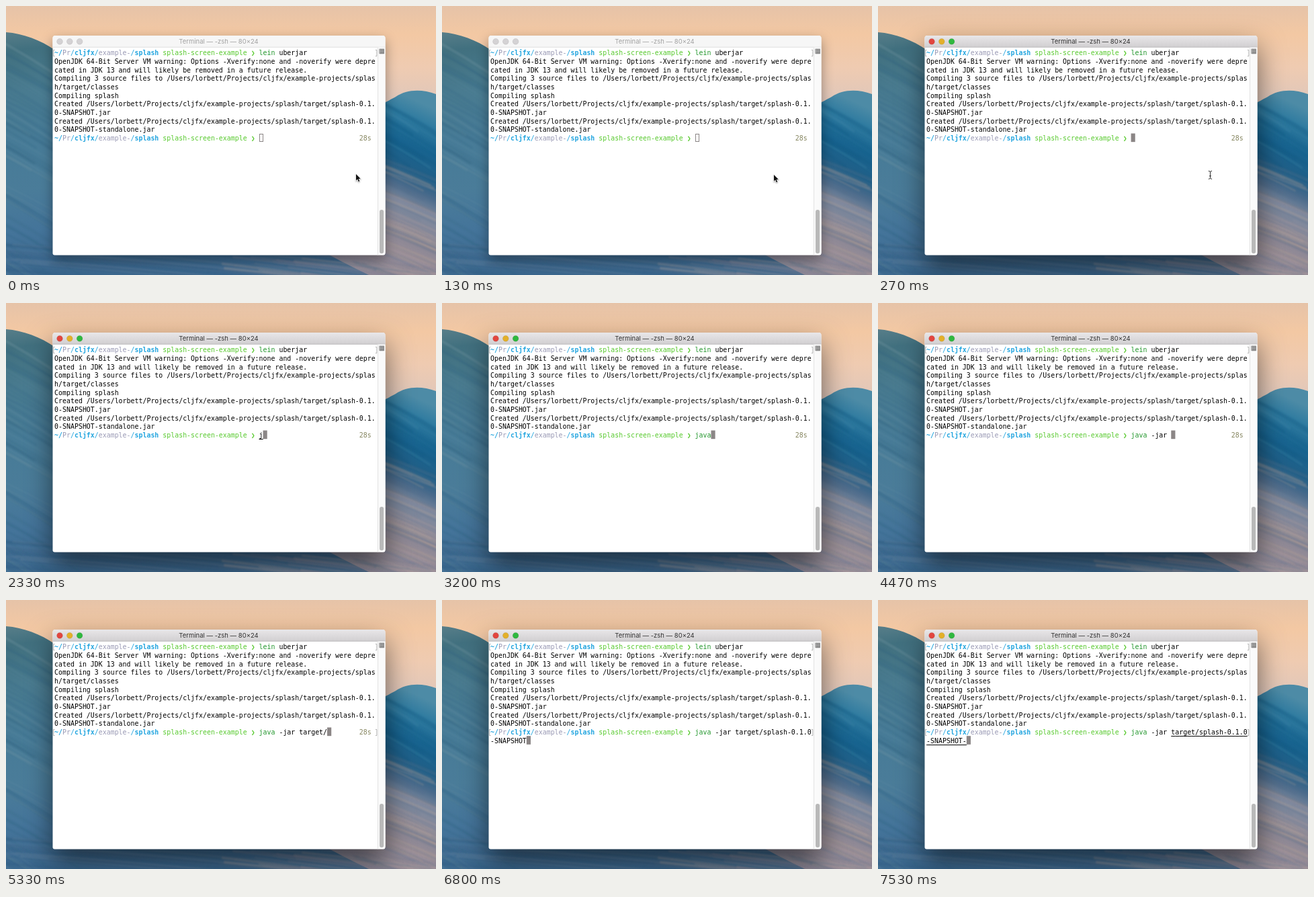
Write an HTML page with a canvas that moves like this. It is 640x400 px and loops after 8000 ms.

```html
<!DOCTYPE html>
<html lang="en">
<head>
<meta charset="utf-8">
<title>Terminal</title>
<style>
html, body { margin: 0; width: 100%; height: 100%; overflow: hidden; background: #2d6385; }
canvas { display: block; width: 640px; height: 400px; }
</style>
</head>
<body>
<canvas id="stage" width="640" height="400"></canvas>
<script>
const LOOP = 8000;
const ACTIVE_AT = 270, TYPING_AT = 2330, MARKS_AT = 5330;
const stage = document.getElementById('stage');
const ctx = stage.getContext('2d');

// Terminal grid
const COLS = 80, CELL = 5.97, ROW = 12.66, LEFT = 72.1, TOP = 63.4;
const PROMPT_ROW = 10, PROMPT_COLS = 51;
const MONO = '"DejaVu Sans Mono", "Liberation Mono", monospace';
const CYAN = '#23a5df', GREY = '#9999b4', LIME = '#57c92d', GREEN = '#23972d', OLIVE = '#85855f';

const PROMPT = [
  ['~/', CYAN, 1], ['Pr', GREY], ['/', CYAN], ['cljfx', CYAN, 1], ['/', CYAN],
  ['example-', GREY], ['/', CYAN], ['splash', CYAN, 1],
  [' splash-screen-example ', LIME], ['❯ ', LIME, 1]
];

const OUTPUT = [
  'OpenJDK 64-Bit Server VM warning: Options -Xverify:none and -noverify were depre',
  'cated in JDK 13 and will likely be removed in a future release.',
  'Compiling 3 source files to /Users/lorbett/Projects/cljfx/example-projects/splas',
  'h/target/classes',
  'Compiling splash',
  'Created /Users/lorbett/Projects/cljfx/example-projects/splash/target/splash-0.1.',
  '0-SNAPSHOT.jar',
  'Created /Users/lorbett/Projects/cljfx/example-projects/splash/target/splash-0.1.',
  '0-SNAPSHOT-standalone.jar'
];

// Command length over time; completed paths lose their underline.
const COMMAND = 'java -jar target/splash-0.1.0-SNAPSHOT-';
const ARG = 10;
const KEYS = [
  [0, 0], [2330, 1], [2800, 2], [3000, 3], [3200, 4], [3400, 5], [3730, 6],
  [4070, 8], [4270, 9], [4470, 10], [4730, 11], [4870, 12], [4930, 13],
  [5270, 17], [5870, 18], [5930, 19], [6800, 38], [7530, 39]
];
const COMPLETED = [17, 38];

const POINTER = [[0, 521, 250], [70, 507, 250.5], [130, 494, 251]];

const at = (list, t) => list.filter(item => item[0] <= t).pop();

function seeded(seed) {
  return () => (seed = (seed * 16807) % 2147483647) / 2147483647;
}

function gradient(g, x0, y0, x1, y1, stops) {
  const fill = g.createLinearGradient(x0, y0, x1, y1);
  stops.forEach(([p, c]) => fill.addColorStop(p, c));
  return fill;
}

// Long soft streaks of water, crossing a box with the given fall.
function streaks(g, rand, count, [x, y, w, h], fall, colors) {
  g.save();
  g.lineCap = 'round';
  g.filter = 'blur(1px)';
  for (let i = 0; i < count; i++) {
    const sx = x + rand() * w * 0.5 - w * 0.3;
    const sy = y + rand() * h;
    const len = w * (0.7 + rand() * 0.8);
    const drop = len * fall * (0.9 + rand() * 0.2);
    g.strokeStyle = colors[Math.floor(rand() * colors.length)];
    g.globalAlpha = 0.1 + rand() * 0.2;
    g.lineWidth = 1 + rand() * 4;
    g.beginPath();
    g.moveTo(sx, sy);
    g.quadraticCurveTo(sx + len * 0.5, sy + drop * 0.42, sx + len, sy + drop);
    g.stroke();
  }
  g.restore();
}

function makeWallpaper() {
  const sheet = document.createElement('canvas');
  sheet.width = 640;
  sheet.height = 400;
  const g = sheet.getContext('2d');
  const rand = seeded(77);

  g.fillStyle = gradient(g, 0, 0, 0, 140, [[0, '#e6c3a8'], [0.3, '#f3c8a3'], [0.65, '#efcbb1'], [1, '#e0c7ba']]);
  g.fillRect(0, 0, 640, 400);

  // right swell
  g.save();
  g.beginPath();
  g.moveTo(400, 180);
  g.bezierCurveTo(520, 175, 562, 144, 580, 135);
  g.bezierCurveTo(596, 124, 618, 123, 640, 131);
  g.lineTo(640, 400);
  g.lineTo(300, 400);
  g.closePath();
  g.clip();
  g.fillStyle = gradient(g, 578, 126, 470, 366, [
    [0, '#4d8ba6'], [0.1, '#2f7ba0'], [0.24, '#17638f'], [0.38, '#215f87'],
    [0.47, '#4b6b8b'], [0.56, '#7d899e'], [0.72, '#8b8795'], [0.86, '#9a8f98'], [1, '#8a8796']
  ]);
  g.fillRect(300, 100, 340, 300);
  streaks(g, rand, 16, [555, 140, 90, 55], 0.6, ['#125983', '#4388a9', '#17638c']);
  streaks(g, rand, 60, [545, 220, 110, 175], 0.42, ['#b9a29f', '#c9ab98', '#4c6988', '#667b95', '#a398a3']);
  g.restore();

  // left wave, sweeping under the window
  g.save();
  g.beginPath();
  g.moveTo(0, 39);
  g.bezierCurveTo(26, 41, 52, 51, 72, 65);
  g.bezierCurveTo(180, 145, 310, 290, 540, 400);
  g.lineTo(0, 400);
  g.closePath();
  g.clip();
  g.fillStyle = gradient(g, 0, 38, 40, 400, [
    [0, '#587e89'], [0.08, '#41707f'], [0.25, '#497b90'], [0.45, '#477b97'],
    [0.65, '#4a7c99'], [0.82, '#44749a'], [1, '#3b678d']
  ]);
  g.fillRect(0, 30, 560, 370);
  streaks(g, rand, 50, [-20, 30, 120, 350], 0.6, ['#2d6180', '#346780', '#7799a5', '#6893a8']);
  streaks(g, rand, 30, [0, 350, 520, 50], 0.09, ['#2d577e', '#4a7397', '#7189a2']);
  g.restore();

  streaks(g, rand, 30, [390, 355, 260, 45], 0.13, ['#b2999f', '#c4a9a0', '#667890', '#8a8799']);
  return sheet;
}

function box(x, y, w, h, r, fill) {
  ctx.beginPath();
  ctx.roundRect(x, y, w, h, r);
  ctx.fillStyle = fill;
  ctx.fill();
}

function rect(x, y, w, h, fill) {
  ctx.fillStyle = fill;
  ctx.fillRect(x, y, w, h);
}

function drawWindow(active) {
  ctx.save();
  ctx.shadowColor = active ? 'rgba(0,0,0,.55)' : 'rgba(0,0,0,.38)';
  ctx.shadowBlur = active ? 40 : 18;
  ctx.shadowOffsetY = active ? 17 : 7;
  box(69.5, 44, 495, 326.5, [4, 4, 3, 3], '#fff');
  ctx.restore();

  box(69.5, 44, 495, 17.5, [4, 4, 0, 0], active
    ? gradient(ctx, 0, 44, 0, 61, [[0, '#e9e7e9'], [1, '#d1cfd1']])
    : '#f6f6f6');
  rect(69.5, 60.8, 495, 0.7, active ? '#b3b1b3' : '#d5d5d5');

  const lights = active ? ['#e2463f', '#e3b02a', '#2fb83f'] : ['#d4d2d4', '#d4d2d4', '#d4d2d4'];
  lights.forEach((color, i) => {
    ctx.beginPath();
    ctx.arc(80 + i * 14.8, 52.8, 4.4, 0, Math.PI * 2);
    ctx.fillStyle = color;
    ctx.fill();
    ctx.lineWidth = 0.5;
    ctx.strokeStyle = 'rgba(0,0,0,.16)';
    ctx.stroke();
  });

  ctx.font = '9.5px Inter, Roboto, sans-serif';
  ctx.textAlign = 'center';
  ctx.fillStyle = active ? '#333' : '#a2a2a2';
  ctx.fillText('Terminal — -zsh — 80×24', 316.5, 56.4);
  ctx.textAlign = 'left';

  // scroller and split button
  rect(553, 61.5, 11.5, 306, '#fafafa');
  rect(553, 61.5, 0.8, 309, '#dddddd');
  box(556, 303, 6.2, 65, 3, '#b9b9b9');
  box(555.5, 63.5, 7.5, 7.8, 1, '#777');
  rect(556.3, 64.3, 5.9, 6.2, '#eee');
  for (let y = 65; y < 70; y += 2) rect(556.5, y, 5.5, 1, '#444');
}

const cellX = col => LEFT + col * CELL;
const rowY = row => TOP + row * ROW;

function print(text, row, col, color = '#000', bold = false) {
  ctx.font = `${bold ? 'bold ' : ''}${(CELL / 0.602).toFixed(2)}px ${MONO}`;
  ctx.fillStyle = color;
  [...text].forEach((ch, i) => {
    const n = col + i;
    ctx.fillText(ch, cellX(n % COLS), rowY(row + Math.floor(n / COLS)) + 10);
  });
}

function underline(row, from, to) {
  for (let n = from; n < to; n++) {
    const y = Math.round(rowY(row + Math.floor(n / COLS)) + 11.9);
    rect(cellX(n % COLS), y, CELL + 0.1, 1, '#000');
  }
}

function printPrompt(row) {
  let col = 0;
  for (const [text, color, bold] of PROMPT) {
    print(text, row, col, color, bold);
    col += text.length;
  }
}

function marks(row) {
  const y = Math.round(rowY(row)) + 2.5;
  ctx.strokeStyle = '#a0a0a0';
  ctx.lineWidth = 0.8;
  for (const [x, turn] of [[70.7, 1.8], [551.8, -1.8]]) {
    ctx.beginPath();
    ctx.moveTo(x + turn, y);
    ctx.lineTo(x, y);
    ctx.lineTo(x, y + 9);
    ctx.lineTo(x + turn, y + 9);
    ctx.stroke();
  }
}

function drawCursor(n, active) {
  const x = cellX(n % COLS);
  const y = rowY(PROMPT_ROW + Math.floor(n / COLS));
  if (active) {
    rect(x, y - 0.5, CELL + 0.2, ROW, '#8b8686');
  } else {
    ctx.strokeStyle = '#8b8686';
    ctx.lineWidth = 1;
    ctx.strokeRect(Math.round(x) + 0.5, Math.round(y) + 0.5, 5, 11);
  }
}

function drawCommand(t) {
  const active = t >= ACTIVE_AT;
  const count = at(KEYS, t)[1];
  const typed = COMMAND.slice(0, count);

  printPrompt(PROMPT_ROW);
  if (count < 26) print('28s', PROMPT_ROW, 76, OLIVE);
  if (t >= MARKS_AT) marks(PROMPT_ROW);

  print(typed.slice(0, 4), PROMPT_ROW, PROMPT_COLS, count < 4 ? '#000' : GREEN);
  print(typed.slice(4), PROMPT_ROW, PROMPT_COLS + 4);
  if (count < 4) {
    underline(PROMPT_ROW, PROMPT_COLS, PROMPT_COLS + count);
  } else if (!COMPLETED.includes(count)) {
    underline(PROMPT_ROW, PROMPT_COLS + ARG, PROMPT_COLS + count);
  }
  drawCursor(PROMPT_COLS + count, active);
}

function drawArrow(x, y) {
  const shape = [[0, 0], [0, 9.6], [2.2, 7.6], [3.7, 11.2], [5.3, 10.4], [3.8, 7], [6.7, 6.8]];
  ctx.beginPath();
  shape.forEach(([dx, dy]) => ctx.lineTo(x + dx, y + dy));
  ctx.closePath();
  ctx.save();
  ctx.shadowColor = 'rgba(0,0,0,.4)';
  ctx.shadowBlur = 2;
  ctx.shadowOffsetY = 1;
  ctx.lineWidth = 1.2;
  ctx.strokeStyle = '#fff';
  ctx.stroke();
  ctx.restore();
  ctx.fillStyle = '#111';
  ctx.fill();
}

function drawBeam(x, y) {
  ctx.beginPath();
  for (const s of [-1, 1]) {
    ctx.moveTo(x - 2.6, y + s * 6);
    ctx.quadraticCurveTo(x, y + s * 6, x, y + s * 4.2);
    ctx.quadraticCurveTo(x, y + s * 6, x + 2.6, y + s * 6);
  }
  ctx.moveTo(x, y - 4.5);
  ctx.lineTo(x, y + 4.5);
  ctx.moveTo(x - 1.5, y + 1.5);
  ctx.lineTo(x + 1.5, y + 1.5);
  ctx.strokeStyle = '#333';
  ctx.lineWidth = 1;
  ctx.stroke();
}

const wallpaper = makeWallpaper();

function draw(t) {
  ctx.drawImage(wallpaper, 0, 0);
  drawWindow(t >= ACTIVE_AT);

  marks(0);
  printPrompt(0);
  print('lein', 0, PROMPT_COLS, GREEN);
  print('uberjar', 0, PROMPT_COLS + 5);
  OUTPUT.forEach((line, i) => print(line, i + 1, 0));
  drawCommand(t);

  if (t < ACTIVE_AT) {
    const [, x, y] = at(POINTER, t);
    drawArrow(x, y);
  } else if (t < TYPING_AT) {
    drawBeam(494.5, 251.3);
  }
}

const start = performance.now();
function tick() {
  draw((performance.now() - start) % LOOP);
  requestAnimationFrame(tick);
}
tick();
</script>
</body>
</html>
```
